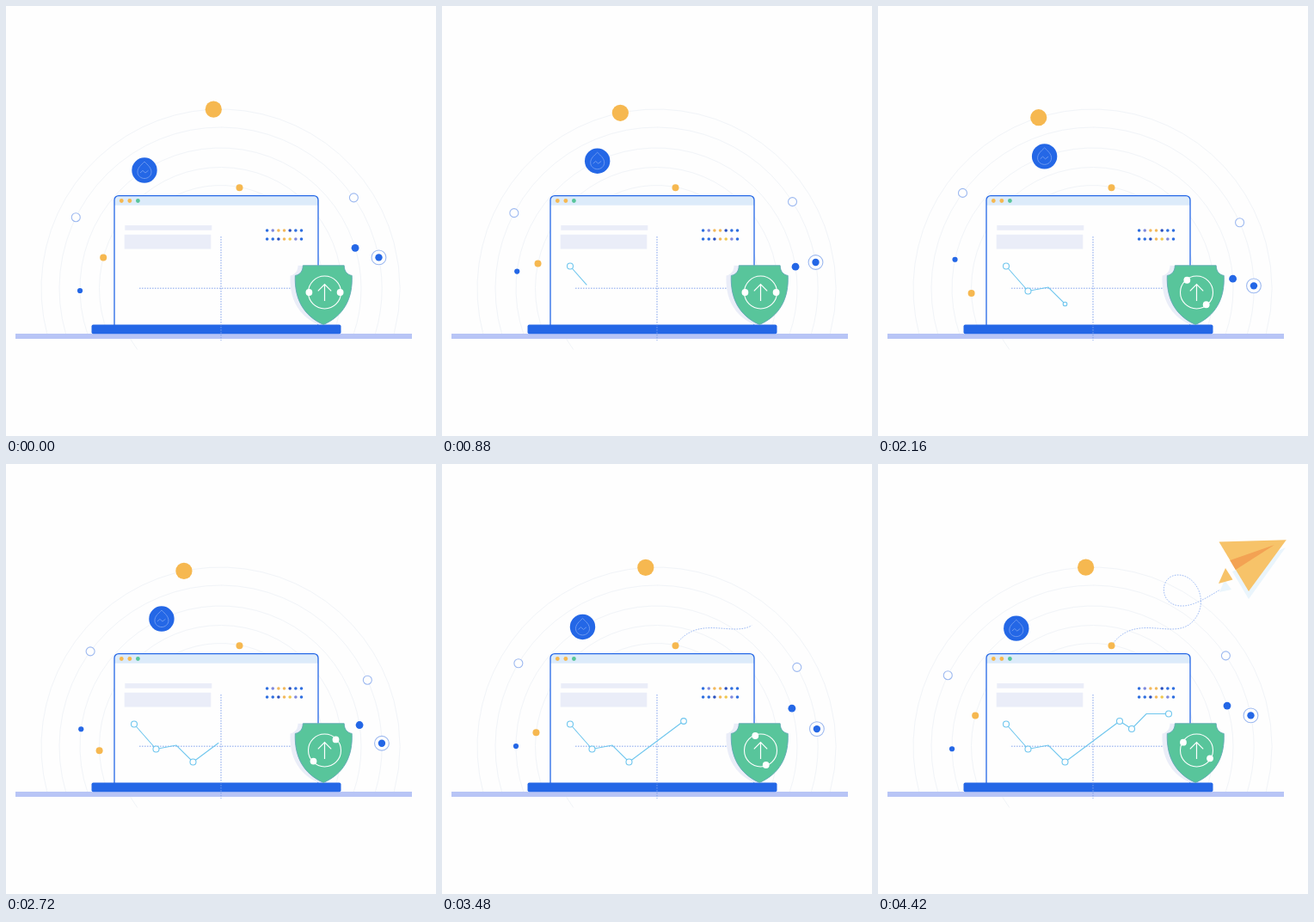
An HTML page with a canvas that plays this animation: 500x500 px, repeating every 4.44 s.

```html
<!DOCTYPE html>
<html>
<head>
<meta charset="utf-8">
<style>
  html, body { margin: 0; width: 100%; height: 100%; overflow: hidden; background: #fefefe; }
  canvas { display: block; }
</style>
</head>
<body>
<canvas id="stage" width="500" height="500"></canvas>
<script>
const ctx = document.getElementById('stage').getContext('2d');
const LOOP = 4440, CX = 249.5, CY = 328.5, TAU = Math.PI * 2;
const BLUE = '#2467e6', ORANGE = '#f6b850', GREEN = '#58c59b', PALE = '#eaedf8', LINE = '#6fc6ee';

const clamp = v => Math.max(0, Math.min(1, v));
const ease = v => (v = clamp(v)) * v * (3 - 2 * v);

// Out and back between 0 and 1, wrapping around the loop.
function swing(t, start, peak, end) {
  if (t >= start + LOOP) t -= LOOP;
  return t < peak ? ease((t - start) / (peak - start)) : ease((end - t) / (end - peak));
}

function paint(path, fill, stroke, width = 1) {
  if (fill) { ctx.fillStyle = fill; ctx.fill(path); }
  if (stroke) { ctx.strokeStyle = stroke; ctx.lineWidth = width; ctx.stroke(path); }
}

function circle(x, y, r, fill, stroke, width) {
  const p = new Path2D();
  p.arc(x, y, r, 0, TAU);
  paint(p, fill, stroke, width);
}

function rect(x, y, w, h, fill, radius = 0, stroke, width) {
  const p = new Path2D();
  p.roundRect(x, y, w, h, radius);
  paint(p, fill, stroke, width);
}

const shape = (d, fill, stroke, width) => paint(new Path2D(d), fill, stroke, width);

function dashed(d, color) {
  ctx.setLineDash([1.6, 1.4]);
  shape(d, null, color, 0.9);
  ctx.setLineDash([]);
}

// Path data for the first `length` units of a polyline.
function cut(points, length) {
  let d = 'M' + points[0];
  for (let i = 1; i < points.length && length > 0; i++) {
    const [ax, ay] = points[i - 1], [bx, by] = points[i];
    const size = Math.hypot(bx - ax, by - ay), k = Math.min(1, length / size);
    d += `L${ax + (bx - ax) * k} ${ay + (by - ay) * k}`;
    length -= size;
  }
  return d;
}

const measure = pts => pts.slice(1).reduce((sum, p, i) => sum + Math.hypot(p[0] - pts[i][0], p[1] - pts[i][1]), 0);

function flatten(start, curves) {
  const pts = [start];
  for (const [bx, by, cx, cy, dx, dy] of curves) {
    const [ax, ay] = pts[pts.length - 1];
    for (let i = 1; i <= 30; i++) {
      const k = i / 30, m = 1 - k;
      const mix = (a, b, c, d) => a * m ** 3 + 3 * b * m * m * k + 3 * c * m * k * k + d * k ** 3;
      pts.push([mix(ax, bx, cx, dx), mix(ay, by, cy, dy)]);
    }
  }
  return pts;
}

const trail = flatten([271.5, 211], [
  [300, 170, 345, 208, 367, 182],
  [386, 160, 370, 129, 349, 129],
  [326, 129, 326, 166, 354, 165],
  [366, 165, 380, 157, 398, 146]
]);
const trailLength = measure(trail);

// x, y, time reached, has a marker
const chart = [
  [149, 302.5, 260, 1], [174.5, 331.5, 1080, 1], [198, 327, 1630, 0], [217.5, 346.5, 2130, 1],
  [281, 299, 3390, 1], [295, 308, 3800, 1], [312, 290.5, 4020, 0], [338, 290.5, 4280, 1]
];
const chartPoints = chart.map(p => p.slice(0, 2));

function drawRings() {
  for (const r of [208.5, 187.5, 163.5, 141, 120]) {
    const drop = Math.asin((r === 120 ? 71 : 53) / r);
    const p = new Path2D();
    p.arc(CX, CY, r, Math.PI - drop, r === 120 ? 0 : drop);
    paint(p, null, '#f1f4f8');
  }
}

// Angles are in degrees, clockwise from the left.
function orbit(radius, degrees, draw) {
  const a = degrees * Math.PI / 180;
  draw(CX - radius * Math.cos(a), CY - radius * Math.sin(a));
}

function drawBadge(x, y) {
  circle(x, y, 14.7, BLUE);
  ctx.save();
  ctx.translate(x, y);
  shape('M0-10C4-6 8-3 8 2C8 6.5 4 9.5 0 9.5S-8 6.5-8 2C-8-3-4-6 0-10Z', null, '#7ba4f2', 0.8);
  shape('M-5 3L-2 .3L1 3L4.5 .3', null, '#7ba4f2', 0.8);
  ctx.restore();
}

function drawOrbits(t) {
  const early = swing(t, -200, 1770, 3900), late = swing(t, 350, 2420, 4430);
  const dot = (r, color) => (x, y) => circle(x, y, r, color);
  const hollow = (x, y) => circle(x, y, 5, '#fefefe', '#9db9f0', 1.1);
  orbit(208.5, 88.25 - 17.3 * early, dot(9.6, ORANGE));
  orbit(163.5, 56.8 + 14.5 * early, drawBadge);
  orbit(163.5, -1.3 + 14.5 * early, dot(3.1, BLUE));
  orbit(163.5, 162.8 + 14.5 * early, dot(4.4, BLUE));
  orbit(187.5, 26.2 + 10.6 * late, hollow);
  orbit(187.5, 145.7 + 10.6 * late, hollow);
  orbit(141, 14.8 - 17.8 * late, dot(4, ORANGE));
  orbit(187.5, 168.9 + 10.6 * late, (x, y) => {
    circle(x, y, 8.4, '#fefefe', '#9db9f0', 1.1);
    circle(x, y, 4.2, BLUE);
  });
}

function drawLaptop() {
  rect(126, 220.6, 237, 156, '#fefefe', 5);
  rect(126, 220.6, 237, 11.2, '#dcebfa', [5, 5, 0, 0]);
  rect(126, 220.6, 237, 156, null, 5, BLUE, 1.3);
  [ORANGE, ORANGE, GREEN].forEach((c, i) => circle(134.3 + 9.55 * i, 226.5, 2.4, c));
  rect(138.3, 255, 101, 5.8, PALE);
  rect(137.7, 265.8, 100.6, 16.6, PALE);
  const palette = { b: '#2f6fe0', p: '#8089dc', o: '#f3b95c', d: '#2a50bd', y: '#f0c84e' };
  ['bpoodbb', 'bbdoypb'].forEach((row, j) =>
    [...row].forEach((c, i) => circle(303.6 + 6.65 * i, 261 + 10 * j, 1.8, palette[c])));
  rect(11, 381, 461, 6, '#b8c5f6');
  rect(99.5, 370.5, 290, 10.8, BLUE, 2);
  dashed('M250 268V389', '#7b9eeb');
  dashed('M155 328.2H340', '#7b9eeb');
}

function drawChart(t) {
  let length = 0;
  chart.slice(1).forEach(([x, y, time], i) => {
    const [px, py, begun] = chart[i];
    length += Math.hypot(x - px, y - py) * clamp((t - begun) / (time - begun));
  });
  if (length) shape(cut(chartPoints, length), null, LINE, 1.1);
  for (const [x, y, time, marked] of chart) {
    const grow = clamp((t - time + 100) / 200);
    if (marked && grow) circle(x, y, 3.5 * grow, '#fefefe', LINE, 1.1);
  }
}

const SHIELD = 'M345.3 301.8H393.2C393.2 308 396.5 312.6 402.2 313.4C403.4 340 393 360 369.2 370.5C345.5 360 335.2 340 336.3 313.4C342 312.6 345.3 308 345.3 301.8Z';

function drawShield(t) {
  ctx.save();
  ctx.translate(-5.8, 0);
  shape(SHIELD, PALE);
  ctx.restore();
  shape(SHIELD, GREEN, '#5fa9b4', 0.9);
  const x = 370.5, y = 333;
  circle(x, y, 19, null, '#fff', 1.1);
  shape('M370.5 343V323.5M362.8 331.3L370.5 323.5L378.2 331.3', null, '#fff', 1.2);
  const a = Math.max(0, t - 1815) * 0.15 * Math.PI / 180;
  for (const side of [-1, 1]) {
    circle(x + side * 18.1 * Math.cos(a), y + side * 18.1 * Math.sin(a), 3.9, '#fff');
  }
}

function drawPlane(t) {
  const drawn = clamp((t - 3160) / 940);
  if (drawn) dashed(cut(trail, trailLength * drawn), '#8fb0f2');
  circle(271.5, 211.3, 4, ORANGE);
  const size = ease((t - 4040) / 270);
  if (!size) return;
  ctx.save();
  ctx.translate(398, 146);
  ctx.scale(size, size);
  ctx.translate(-398, -146);
  shape('M412 125L474 97L431 157ZM403 135L397 149L411 146Z', '#eaf5fc');
  shape('M404 121L396 139L412.5 134.5Z', '#f7c369');
  shape('M396.5 90.6L474.8 88.3L431 148Z', '#f7c369');
  shape('M409.3 112L461 94L415.8 123Z', '#f3a253');
  ctx.restore();
}

function frame(now) {
  const t = now % LOOP;
  ctx.fillStyle = '#fefefe';
  ctx.fillRect(0, 0, 500, 500);
  drawRings();
  drawOrbits(t);
  drawLaptop();
  drawChart(t);
  drawShield(t);
  drawPlane(t);
}

const begin = performance.now();
function tick() {
  frame(performance.now() - begin);
  requestAnimationFrame(tick);
}
tick();
</script>
</body>
</html>
```
